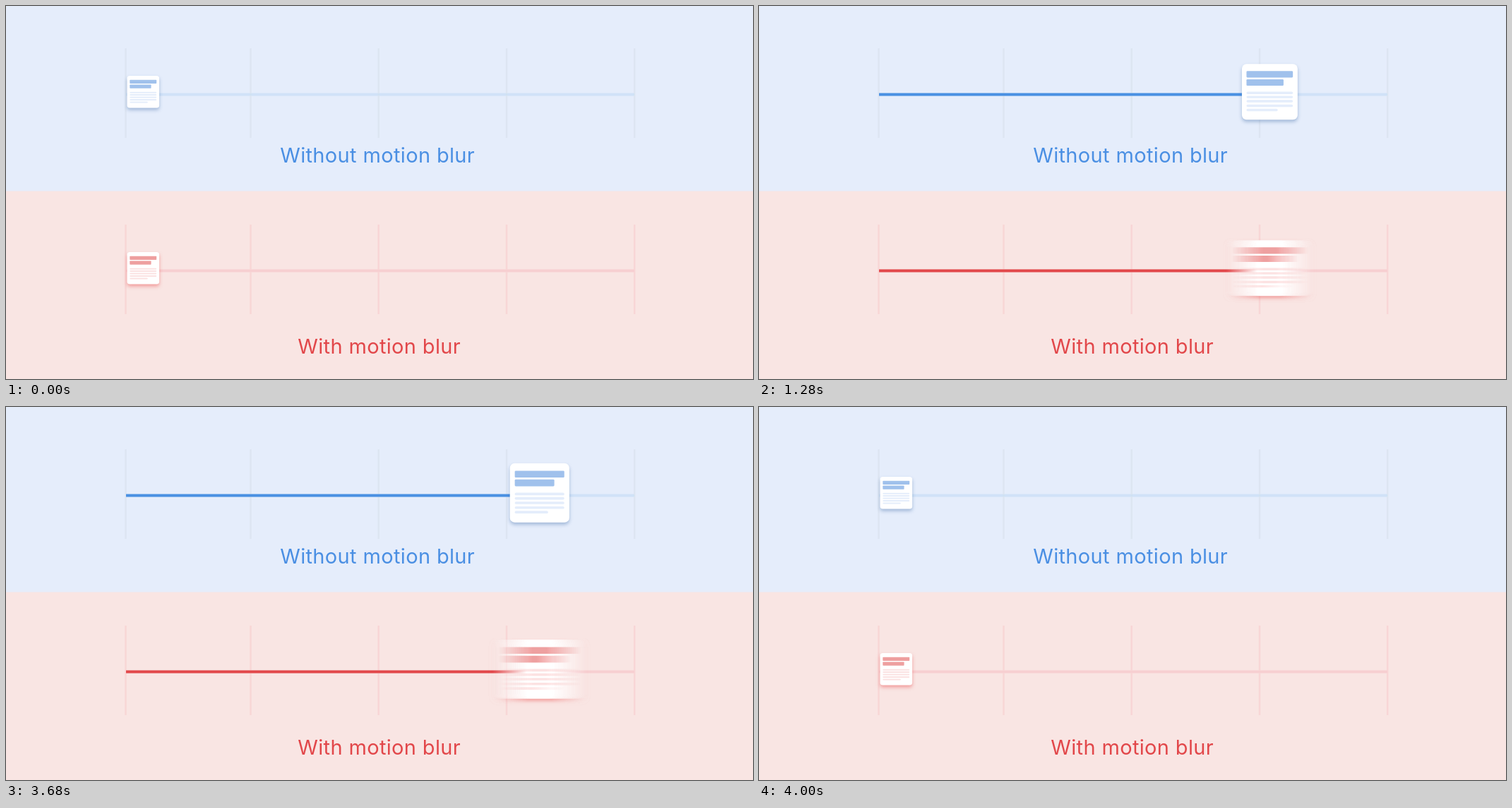
An HTML page with a canvas for the animation above (5 s loop, 1058 px wide and 529 px high).

```html
<!DOCTYPE html>
<html lang="en">
<head>
<meta charset="utf-8">
<title>Motion blur comparison</title>
<style>
  html, body { margin: 0; width: 100%; height: 100%; overflow: hidden; background: #f9e5e3; }
  svg, canvas { position: absolute; left: 0; top: 0; width: 1058px; height: 529px; }
  text { font: 400 29px Inter, "Open Sans", sans-serif; letter-spacing: 0.35px; text-anchor: middle; }
</style>
</head>
<body>
<svg id="stage" viewBox="0 0 1058 529">
  <rect width="1058" height="529" fill="#f9e5e3"/>
  <rect width="1058" height="262.5" fill="#e5edfb"/>
  <text x="526.2" y="222" fill="#4a8fe3">Without motion blur</text>
  <text x="528.7" y="493" fill="#e2474a">With motion blur</text>
</svg>
<canvas id="cards" width="1058" height="529"></canvas>
<script>
const LOOP = 5000, STEP = 40, HALF_SHUTTER = 16;
const W = 1058, BAND = 200, CARD_Y = 121.75, CLIP_Y = 78;
const X0 = 194.3, X1 = 845, TRACK_X = 170;

const rows = [
  { dy: 0, blurred: false, grid: '#dde5f2', track: '#d0e2f8', line: '#4a90e2', bar: '#a0c1ec', thin: '#e4edfb', shadow: 'rgba(60,105,165,.4)' },
  { dy: 250, blurred: true, grid: '#f8d6d6', track: '#f7cfd1', line: '#e2484b', bar: '#ee9f9f', thin: '#fbe2e2', shadow: 'rgba(235,85,85,.5)' }
];

// Ease along cubic-bezier(a, 0, b, 1)
function ease(u, a, b) {
  if (u <= 0) return 0;
  if (u >= 1) return 1;
  let lo = 0, hi = 1, s = 0.5;
  for (let i = 0; i < 30; i++) {
    s = (lo + hi) / 2;
    const r = 1 - s;
    if (3 * r * r * s * a + 3 * r * s * s * b + s * s * s < u) lo = s; else hi = s;
  }
  return s * s * (3 - 2 * s);
}

const forth = t => (t - 996) / 484;
const back = t => (t - 3580) / 420;
const travel = t => t < 2500 ? ease(forth(t), 0.35, 0.345) : 1 - ease(back(t), 0.33, 0.722);
const growth = t => t < 2500 ? ease(forth(t), 0.33, 0.5) : 1 - ease(back(t), 0.33, 0.63);
const cardX = t => X0 + (X1 - X0) * travel(t);

function blurWidth(t) {
  const x = cardX(t);
  const before = Math.abs(x - cardX(t - HALF_SHUTTER));
  const after = Math.abs(cardX(t + HALF_SHUTTER) - x);
  return 2 * Math.min(before, after);
}

function addRect(parent, x, y, width, height, fill) {
  const el = document.createElementNS('http://www.w3.org/2000/svg', 'rect');
  Object.entries({ x, y, width, height, fill }).forEach(([k, v]) => el.setAttribute(k, v));
  return parent.appendChild(el);
}

const stage = document.getElementById('stage');
for (const row of rows) {
  addRect(stage, TRACK_X, 123.5 + row.dy, 720.5, 4, row.track);
  for (const x of [169.5, 346.5, 527.7, 709, 890.2]) {
    addRect(stage, x - 1.25, 60 + row.dy, 2.5, 127, row.grid).style.mixBlendMode = 'darken';
  }
  row.progress = addRect(stage, TRACK_X, 123.5 + row.dy, 0, 4, row.line);
}

const ctx = document.getElementById('cards').getContext('2d');
function makeLayer() {
  const c = document.createElement('canvas');
  c.width = W;
  c.height = BAND;
  return c.getContext('2d');
}
let layer = makeLayer(), spare = makeLayer();

function box(g, x, y, w, h, r, fill) {
  g.fillStyle = fill;
  g.beginPath();
  g.roundRect(x, y, w, h, r);
  g.fill();
}

function drawCard(g, x, scale, row) {
  g.clearRect(0, 0, W, BAND);
  g.save();
  g.translate(x, CARD_Y);
  g.scale(scale, scale);
  g.shadowColor = row.shadow;
  g.shadowOffsetY = 3;
  g.shadowBlur = 5;
  box(g, -45.5, -45.5, 91, 91, 7.5, '#fff');
  g.shadowColor = 'transparent';
  box(g, -38, -33.9, 75.8, 10.4, 1.5, row.bar);
  box(g, -38, -20.5, 60.5, 10.4, 1.5, row.bar);
  [1.8, 8.5, 15.4, 22.7, 29.7].forEach((y, i) =>
    box(g, -38, y - 2, i < 4 ? 75.8 : 51, 4, 2, row.thin));
  g.restore();
}

// Horizontal box blur: average two shifted copies, halving the shift each pass
function smear(width) {
  for (let d = width / 2; d > 0.4; d /= 2) {
    spare.clearRect(0, 0, W, BAND);
    spare.save();
    spare.globalCompositeOperation = 'lighter';
    spare.globalAlpha = 0.5;
    spare.drawImage(layer.canvas, -d / 2, 0);
    spare.drawImage(layer.canvas, d / 2, 0);
    spare.restore();
    [layer, spare] = [spare, layer];
  }
}

function render(t) {
  const x = cardX(t), scale = 0.5 + 0.5 * growth(t);
  ctx.clearRect(0, 0, W, 529);
  for (const row of rows) {
    row.progress.setAttribute('width', (X1 - TRACK_X) * travel(t));
    drawCard(layer, x, scale, row);
    if (row.blurred) smear(blurWidth(t));
    const h = BAND - CLIP_Y;
    ctx.drawImage(layer.canvas, 0, CLIP_Y, W, h, 0, CLIP_Y + row.dy, W, h);
  }
}

const start = performance.now();
function tick() {
  const t = (performance.now() - start) % LOOP;
  render(Math.floor(t / STEP) * STEP);
  requestAnimationFrame(tick);
}
tick();
</script>
</body>
</html>
```
